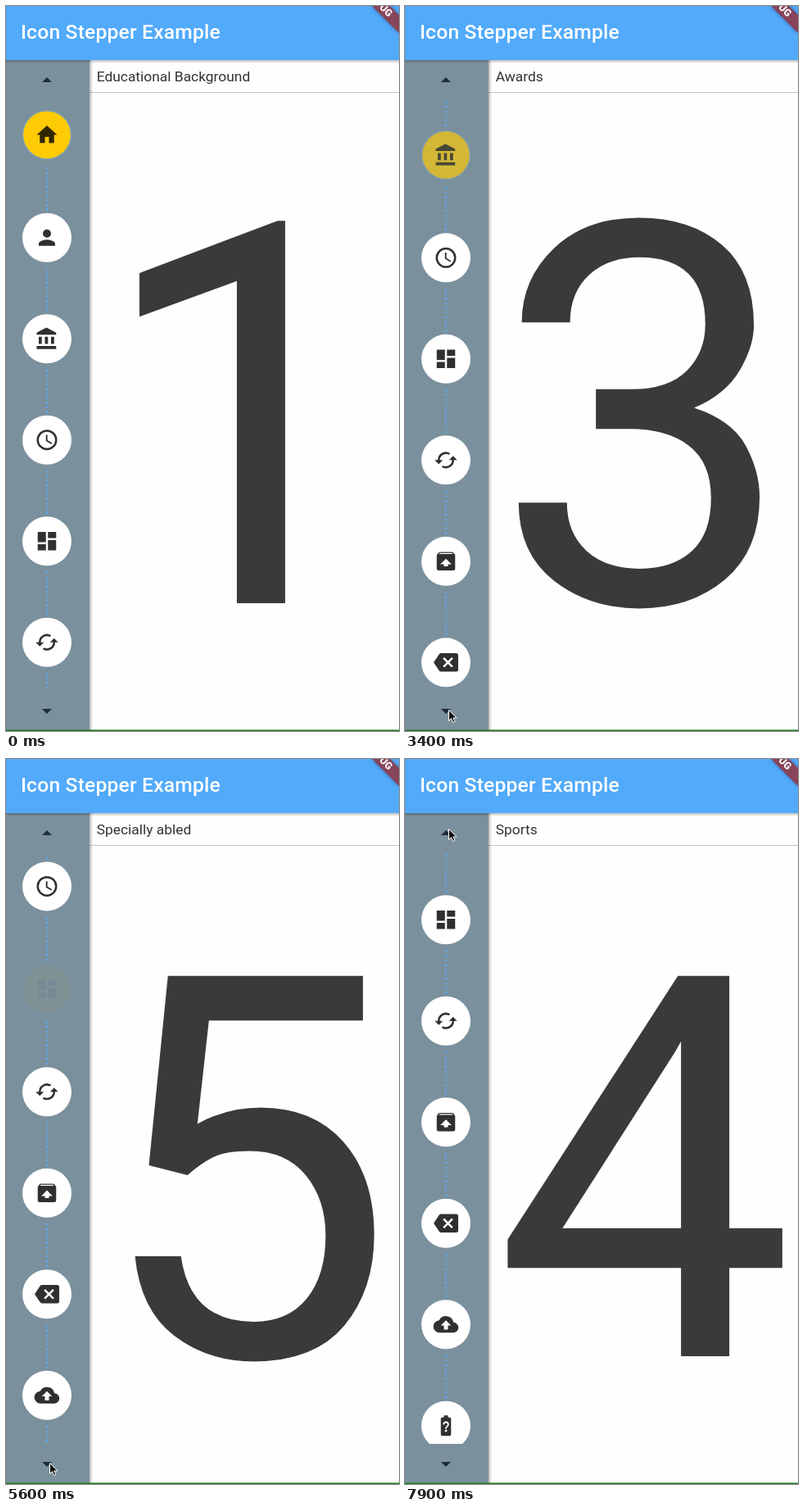
Animation of 480x885 px, one loop 8000 ms. Source, as an HTML page:

```html
<!DOCTYPE html>
<html lang="en">
<head>
<meta charset="utf-8">
<title>Icon Stepper Example</title>
<style>
html, body { margin: 0; width: 100%; height: 100%; overflow: hidden; background: #fff; }
svg { display: block; width: 480px; height: 885px; font-family: Roboto, sans-serif; }
.ribbon { filter: drop-shadow(0 0 2px rgba(0, 0, 0, .4)); }
</style>
</head>
<body>
<svg viewBox="0 0 480 885">
  <defs>
    <clipPath id="list"><rect y="116" width="102" height="720"/></clipPath>
    <linearGradient id="down" x2="0" y2="1"><stop stop-opacity=".25"/><stop offset="1" stop-opacity="0"/></linearGradient>
    <linearGradient id="right"><stop stop-opacity=".28"/><stop offset="1" stop-opacity="0"/></linearGradient>
  </defs>
  <rect width="480" height="885" fill="#fefefe"/>
  <text id="digit" x="292" y="729" font-size="653" text-anchor="middle" fill="#3a3a3a"></text>
  <path d="M102 105.5H480" stroke="#c4c4c4"/>
  <text id="label" x="110.7" y="92" font-size="17.4" fill="#333"></text>
  <rect y="66" width="102" height="818" fill="#7b909d"/>
  <rect x="102" y="66" width="4" height="818" fill="url(#right)"/>
  <g id="steps" clip-path="url(#list)"></g>
  <path d="M44 93l6-6 6 6zM44 858l6 6 6-6z" fill="#1f2c36"/>
  <rect y="66" width="480" height="4" fill="url(#down)"/>
  <rect width="480" height="66" fill="#52aafa"/>
  <text x="18" y="40" font-size="24.7" font-weight="500" letter-spacing=".15" fill="#fff">Icon Stepper Example</text>
  <path class="ribbon" d="M447 0h22l11 11v22z" fill="#88445a"/>
  <text transform="translate(464.5 5) rotate(45)" y="4.4" font-size="12.2" font-weight="900" text-anchor="middle" fill="#fff">UG</text>
  <rect y="883.5" width="480" height="1.5" fill="#1d7a1d"/>
  <path id="cursor" d="M0 0v13l3-2.8 2 4.8 2.4-1-2-4.6h4.2z" fill="#111" stroke="#fff"/>
</svg>
<script>
const LOOP = 8000, FRAME = 100, PITCH = 123.5, TOP = 155.4, GROW = 1.9;
const labels = ['Educational Background', 'Professional Background', 'Awards', 'Sports', 'Specially abled'];

// Step icons on a 24-unit grid
const icons = [
  'M10 20v-6h4v6h5v-8h3L12 3 2 12h3v8z',
  'M8 8a4 4 0 1 0 8 0a4 4 0 1 0-8 0M12 14c-2.7 0-8 1.3-8 4v2h16v-2c0-2.7-5.3-4-8-4z',
  'M4 10h3v7H4zM10 10h3v7h-3zM16 10h3v7h-3zM2 19h19v3H2zM11.5 1L2 6v2h19V6z',
  'M2 12a10 10 0 1 0 20 0a10 10 0 1 0-20 0M4 12a8 8 0 1 0 16 0a8 8 0 1 0-16 0M11 7h1.5v5.25l4.5 2.67-.75 1.23L11 13z',
  'M3 3h8v10H3zM3 15h8v6H3zM13 11h8v10h-8zM13 3h8v6h-8z',
  'M19 8l-4 4h3a6 6 0 0 1-8.8 5.3l-1.46 1.46A8 8 0 0 0 20 12h3zM5 16l4-4H6a6 6 0 0 1 8.8-5.3l1.46-1.46A8 8 0 0 0 4 12H1z',
  'M3 6.5q0-.7.5-1.3l1.4-1.7Q5.3 3 6 3h12q.7 0 1.1.5l1.4 1.7q.5.6.5 1.3V19a2 2 0 0 1-2 2H5a2 2 0 0 1-2-2zM12 9.5L6.5 15H10v2h4v-2h3.5zM5.1 5h13.8l-.9-1H6z',
  'M22 3H7q-1 0-1.6.9L0 12l5.4 8.1q.6.9 1.6.9h15a2 2 0 0 0 2-2V5a2 2 0 0 0-2-2zM19 15.6L17.6 17 14 13.4 10.4 17 9 15.6 12.6 12 9 8.4 10.4 7 14 10.6 17.6 7 19 8.4 15.4 12z',
  'M19.35 10A7.5 7.5 0 0 0 5.35 8A6 6 0 0 0 6 20h13a5 5 0 0 0 .35-10zM14 13v4h-4v-4H7l5-5 5 5z',
  'M14 4V2h-4v2H8.3A1.3 1.3 0 0 0 7 5.3v15.4A1.3 1.3 0 0 0 8.3 22h7.4a1.3 1.3 0 0 0 1.3-1.3V5.3A1.3 1.3 0 0 0 15.7 4zM11 16h2v2h-2zM9 11a3 3 0 1 1 5.3 1.7c-.9.9-1.5 1.5-1.5 2.3h-1.6c0-.8.5-1.5.9-2l.9-.9A1.5 1.5 0 1 0 10.5 11z'
];

// Button presses: time and the step selected
const clicks = [[-2000, 0], [1530, 1], [2773, 2], [4245, 3], [5597, 4], [7701, 3]];

const $ = id => document.getElementById(id);
$('steps').innerHTML = icons.map(d => `<g>
  <path d="M0 37.5v53" stroke="#5aa8ea" stroke-width="2.4" stroke-dasharray="2.4 3.2"/>
  <g>
    <circle r="30"/>
    <circle r="29.7" fill="none" stroke="#7fb2d6" stroke-width=".7"/>
    <path d="${d}" transform="scale(1.25) translate(-12 -12)" fill-opacity=".81" fill-rule="evenodd"/>
  </g>
</g>`).join('');
const steps = [...$('steps').children].map(g => {
  const [line, badge] = g.children, [disc, ring] = badge.children;
  return { g, line, badge, disc, ring };
});

const clamp = x => Math.min(1, Math.max(0, x));
const mix = (a, b, p) => a + (b - a) * p;
const smooth = p => p * p * (3 - 2 * p);

function bounceOut(t) {
  const k = 7.5625;
  if (t < 1 / 2.75) return k * t * t;
  if (t < 2 / 2.75) return k * (t - 1.5 / 2.75) ** 2 + .75;
  if (t < 2.5 / 2.75) return k * (t - 2.25 / 2.75) ** 2 + .9375;
  return k * (t - 2.625 / 2.75) ** 2 + .984375;
}

function drawCursor(t) {
  const enter = smooth(clamp((t - 600) / 400));
  const rise = smooth(clamp((t - 5809) / 600));
  const x = mix(200, 53.5, enter) + 62 * rise * (1 - rise);
  const y = mix(mix(890, 859.5, enter), 85.5, rise);
  $('cursor').setAttribute('transform', `translate(${x} ${y})`);
}

function draw(t) {
  const n = clicks.filter(c => c[0] <= t).length - 1;
  const [start, sel] = clicks[n];
  const from = n ? clicks[n - 1][1] : sel;
  const p = clamp((t - start) / 1000);
  const fade = clamp(p + .04);
  const scroll = PITCH * mix(from, sel, bounceOut(p));

  $('digit').textContent = sel + 1;
  $('label').textContent = labels[sel];
  steps.forEach(({ g, line, badge, disc, ring }, i) => {
    const on = i === sel;
    const y = TOP + i * PITCH - scroll + (on ? GROW : i > sel ? 2 * GROW : 0);
    g.setAttribute('transform', `translate(50 ${y})`);
    line.setAttribute('transform', `translate(0 ${on ? GROW : 0})`);
    badge.setAttribute('opacity', on ? fade : 1);
    disc.setAttribute('fill', on ? '#ffcb05' : '#fff');
    disc.setAttribute('r', on ? 28.9 : 30);
    ring.setAttribute('visibility', on ? 'visible' : 'hidden');
  });
  drawCursor(t);
}

function tick() {
  const t = performance.now() % LOOP;
  draw(Math.floor(t / FRAME) * FRAME);
  requestAnimationFrame(tick);
}
tick();
</script>
</body>
</html>
```
